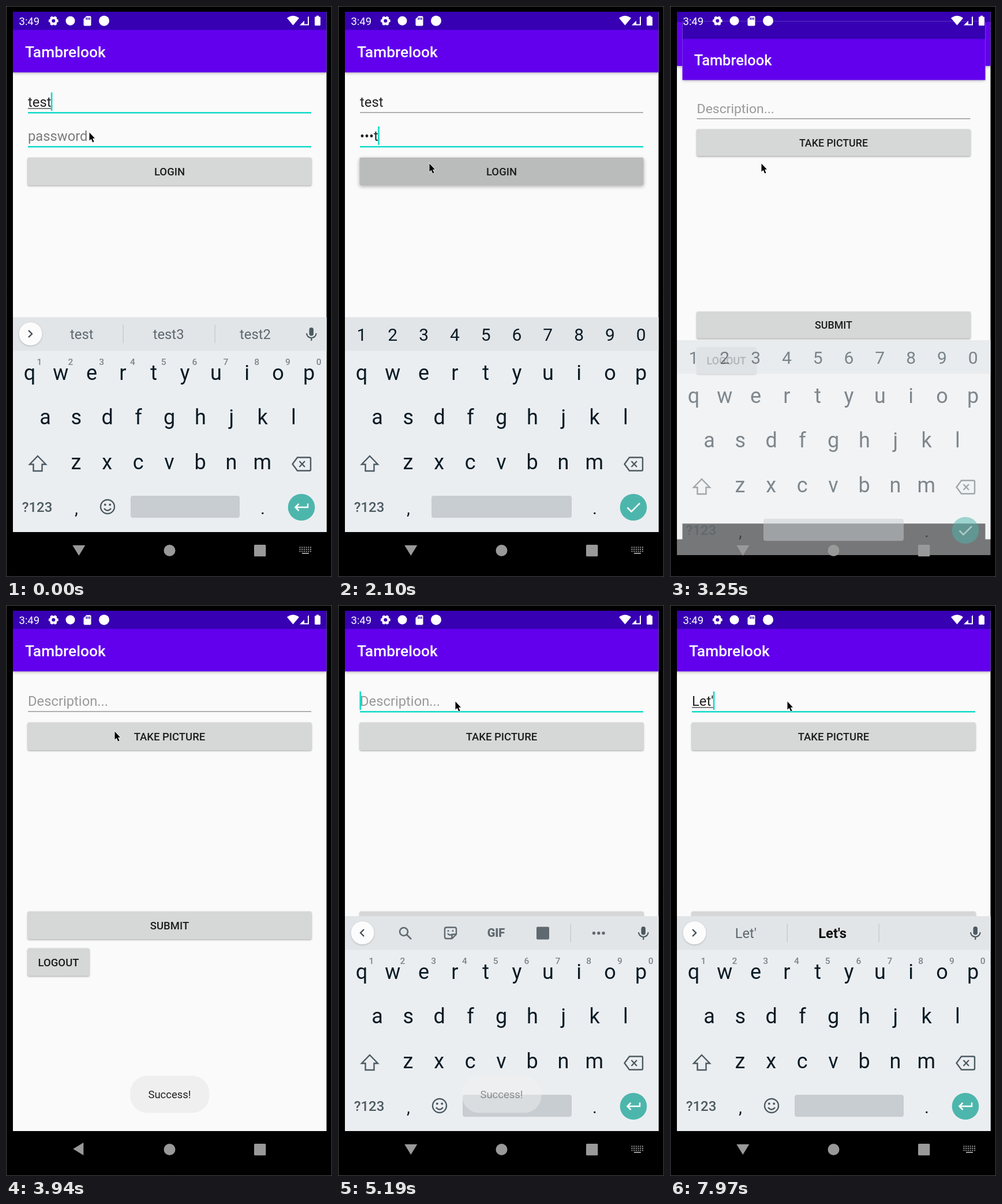
Write an HTML page with a canvas that moves like this. It is 565 px wide and 991 px high and loops after 8 s.

```html
<!DOCTYPE html>
<html lang="en">
<head>
<meta charset="utf-8">
<title>Login and compose</title>
<style>
  html, body { margin: 0; width: 100%; height: 100%; overflow: hidden; background: #000; }
  canvas { display: block; }
</style>
</head>
<body>
<canvas id="stage" width="565" height="991"></canvas>
<script>
const ctx = document.getElementById('stage').getContext('2d');
const LOOP = 8000;
const APP_NAME = 'Tambrelook';
const ACCENT = '#0fdcc8', KEY = '#0a1b25', KEY_ICON = '#4c5a62', NAV = '#999';
const CENTER_X = 283.5, CENTER_Y = 490;

// Steps: [start time, value]; each value holds until the next start.
const pointer = [[0, [144, 219]], [1300, [144, 228]], [1440, [148, 240]], [1560, [158, 270]],
  [1710, [158, 272]], [1830, [158, 273]], [3940, [188, 219]], [4060, [212, 154]],
  [4210, [208, 160]], [4340, [203, 166]], [4490, [203, 167]]];
const caretOn = [[0, 1], [1300, 0], [1830, 1], [2390, 0], [2840, 1], [5340, 0], [5900, 1], [6440, 0], [6860, 1]];
const password = [[0, ''], [490, '•e'], [620, '••s'], [890, '•••t'], [2390, '••••']];
const description = [[0, ''], [7420, 'L'], [7690, 'Le'], [7840, 'Let'], [7970, "Let'"]];
const suggestions = [[0, ['test', 'test3', 'test2']], [7420, ['L', 'I', 'Look']],
  [7690, ['Le', 'Let', 'Less']], [7840, ['Let', "Let's", 'Letter']], [7970, ["Let'", "Let's", '']]];
const loginColor = [[0, '#d6d7d7'], [1980, '#c8c9c9'], [2100, '#babcbb'], [2390, '#d6d7d7']];
const opening = [[0, { scale: .877, alpha: .1, old: 1.01 }], [3250, { scale: .965, alpha: 1, old: 1.03 }],
  [3390, { scale: .995, alpha: 1, old: 1.045 }], [3510, { scale: 1, alpha: 1, old: 1.05 }]];
const toastAlpha = [[0, 0], [3390, .7], [3510, 1], [5190, .45], [5340, 0]];
const backTurn = [[0, 1], [3390, .5], [3510, 0], [4920, .5], [5040, 1]];

const at = (steps, t) => steps.findLast(([start]) => t >= start)[1];

function group(draw) {
  ctx.save();
  draw();
  ctx.restore();
}

function zoom(scale) {
  ctx.translate(CENTER_X, CENTER_Y);
  ctx.scale(scale, scale);
  ctx.translate(-CENTER_X, -CENTER_Y);
}

function text(str, x, y, size, color, weight = 400, align = 'center') {
  ctx.font = `${weight} ${size}px Roboto, sans-serif`;
  ctx.textAlign = align;
  ctx.fillStyle = color;
  ctx.fillText(str, x, y);
  return ctx.measureText(str).width;
}

function rect(x, y, w, h, color, radius = 0) {
  ctx.fillStyle = color;
  ctx.beginPath();
  ctx.roundRect(x, y, w, h, radius);
  ctx.fill();
}

function disc(x, y, r, color) {
  ctx.fillStyle = color;
  ctx.beginPath();
  ctx.arc(x, y, r, 0, Math.PI * 2);
  ctx.fill();
}

function fill(d, color) {
  ctx.fillStyle = color;
  ctx.fill(new Path2D(d));
}

function line(d, color, width = 2.4) {
  ctx.strokeStyle = color;
  ctx.lineWidth = width;
  ctx.stroke(new Path2D(d));
}

function shadow(blur, dy, alpha) {
  ctx.shadowColor = `rgba(0,0,0,${alpha})`;
  ctx.shadowBlur = blur;
  ctx.shadowOffsetY = dy;
}

function button(label, y, color = '#d6d7d7', w = 492, pressed = false) {
  group(() => {
    shadow(pressed ? 6 : 3, pressed ? 2 : 1.3, .32);
    rect(37.5, y, w, 48.2, color, 2.6);
  });
  text(label, 37.5 + w / 2, y + 31, 18.49, '#1c1c1c', 500);
}

function field(top, { value, hint = '', hintColor, focused, accent = focused, composing, caret }) {
  const x = 38, base = top + 25;
  if (!value) text(hint, x, base, 23.77, hintColor, 400, 'left');
  const w = value ? text(value, x, base, 23.77, '#222', 400, 'left') : 0;
  if (composing && value) rect(x, base + 2.2, w, 1.4, '#333');
  if (accent) rect(x, top + 34, 491, 2.6, ACCENT);
  else rect(x, top + 34.2, 491, 1.4, '#868686');
  if (focused && caret) rect(x + w - .6, top, 2.6, 32, ACCENT);
}

function appWindow() {
  rect(12, 10, 544, 903, '#fafafa');
  rect(12, 913, 544, 68, '#000');
  group(() => {
    shadow(5, 2, .3);
    rect(12, 41, 544, 74.3, '#6200ee');
  });
  rect(12, 10, 544, 31.5, '#3700b3');
  text(APP_NAME, 33, 88.5, 26.4, '#fff', 500, 'left');
}

function loginWindow(t) {
  const moved = t >= 310, caret = at(caretOn, t);
  appWindow();
  field(150, { value: 'test', focused: !moved, composing: !moved, caret });
  field(209, { value: at(password, t), hint: 'password', hintColor: '#7b7b7b', focused: moved, accent: true, caret });
  button('LOGIN', 263, at(loginColor, t), 492, t >= 1980 && t < 2390);
}

function composeWindow(t) {
  appWindow();
  field(150, { value: at(description, t), hint: 'Description...', hintColor: '#999',
    focused: t >= 4780, composing: true, caret: at(caretOn, t) });
  button('TAKE PICTURE', 203.8);
  button('SUBMIT', 531.8);
  button('LOGOUT', 595.6, '#d6d7d7', 107);
}

function roundToggle(direction) {
  group(() => {
    shadow(3, 1, .22);
    disc(42.5, 569, 20, '#fcfcfc');
  });
  line(`M${42 - 3 * direction} 563l${6 * direction} 6l${-6 * direction} 6`, '#444f55');
}

function microphone() {
  rect(525.5, 558, 7.5, 14.5, KEY_ICON, 3.75);
  line('M521 568a8.3 8 0 0 0 16.6 0M529.3 576v5', KEY_ICON, 2.2);
}

function divider(x) {
  rect(x, 553, 1.3, 32, '#c3c8cb');
}

function suggestionStrip(words, corrected) {
  roundToggle(1);
  words.forEach((word, i) => {
    const bold = corrected && i === 1;
    text(word, 131.3 + 150.3 * i, 578.3, 23.77, bold ? '#101010' : '#5c686f', bold ? 700 : 400);
  });
  divider(202.5);
  divider(361.5);
  microphone();
}

function toolStrip() {
  const color = '#5f6a70';
  roundToggle(-1);
  line('M121 567a7 7 0 1 0-14 0a7 7 0 1 0 14 0M119 572l8 8', color, 2.6);
  line('M188 559.5h14q3 0 3 3v9l-7.5 7.5h-9.5q-3 0-3-3v-13.500q0-3 3-3zM205 571.5h-4.500q-3 0-3 3v4.500M190 570q4 5 8 1', color);
  disc(191, 565.5, 1.5, color);
  disc(199, 565.5, 1.5, color);
  text('GIF', 274, 576, 20, color, 900);
  rect(344, 558.5, 22, 22, color, 2);
  divider(402.5);
  for (const x of [443.5, 451.8, 460]) disc(x, 569.5, 2.7, color);
  microphone();
}

function keyRow(letters, startX, base, size = 36) {
  [...letters].forEach((letter, i) => text(letter, startX + 53.8 * i, base, size, KEY));
}

function keyboard(t) {
  const numeric = t >= 310 && t < 4000;
  rect(12, 540, 544, 373, '#ebeef1');
  rect(12, 540, 544, 58.5, '#e2e5e8');
  if (numeric) keyRow('1234567890', 41, 581, 30);
  else if (t >= 5190 && t < 7420) toolStrip();
  else suggestionStrip(at(suggestions, t), t >= 7840);

  keyRow('qwertyuiop', 41, 648.5);
  keyRow('asdfghjkl', 68, 726);
  keyRow('zxcvbnm', 121.500, 804);
  if (!numeric) {
    [...'1234567890'].forEach((digit, i) => text(digit, 58 + 53.8 * i, 622.5, 15.5, '#7b858a', 500));
    line('M188 869a12 12 0 1 0-24 0a12 12 0 1 0 24 0M170 872q6 7 12 0', KEY_ICON);
    disc(171.8, 865.5, 1.9, KEY_ICON);
    disc(180.2, 865.5, 1.9, KEY_ICON);
  }
  line('M55 781l14 14.500h-6.500v11.500h-15v-11.500h-6.500z', KEY_ICON);
  line('M505 783.5h21q2 0 2 2v19q0 2-2 2h-21l-8.500-11.500zM508.500 790l9.500 10m0-10l-9.500 10', KEY_ICON);
  text('?123', 54, 877.5, 24, KEY_ICON, 500);
  text(',', 122, 882, 30, KEY);
  text('.', 445, 882, 30, KEY);
  const spaceX = numeric ? 162 : 216;
  rect(spaceX, 850, 405 - spaceX, 38.3, '#c8cdd1', 4);
  disc(512, 870, 23.3, '#4db6ac');
  line(numeric ? 'M501.500 870.500l7 7l14.500-14.500' : 'M523 863.500v6.500h-21M507.500 864l-6 6l6 6', '#fff', 2.5);
}

function toast(alpha) {
  if (!alpha) return;
  group(() => {
    ctx.globalAlpha = alpha;
    rect(215, 817, 137.5, 64.5, '#efefef', 30);
    text('Success!', CENTER_X, 856, 18.49, '#222');
  });
}

function statusIcons() {
  text('3:49', 22.5, 32.8, 18.49, '#fff', 400, 'left');
  group(() => {
    ctx.translate(82.3, 25.7);
    line('M5 0a5 5 0 1 0-10 0a5 5 0 1 0 10 0', '#fff', 4);
    for (let i = 0; i < 6; i++) {
      ctx.rotate(Math.PI / 3);
      line('M5 0H8.300', '#fff', 4.5);
    }
  });
  disc(111.5, 25.7, 8, '#fff');
  fill('M139.500 17.500h6q2 0 2 2v13q0 2-2 2h-9q-2 0-2-2v-10z', '#fff');
  for (const x of [138.5, 141.3, 144.1]) rect(x, 20, 1.5, 4, '#3700b3');
  disc(170, 25.7, 9, '#fff');
  fill('M487 21q10.500-8 21 0l-10.500 12.500z', '#fff');
  fill('M509 33.500l16-16v16z', '#fff');
  fill('M517 31.500v-7.200l6-4.500v11.700z', '#3700b3');
  rect(535, 18.5, 10, 15.5, '#fff', 1.5);
  rect(538, 16.8, 4, 3, '#fff');
}

function navIcons(t) {
  group(() => {
    ctx.translate(126.3, 944);
    ctx.rotate(-Math.PI / 2 * at(backTurn, t));
    fill('M-10 0L8-11V11z', NAV);
  });
  disc(CENTER_X, 945, 10, NAV);
  rect(430, 935, 20.3, 20.3, NAV, 1.5);
  if (t >= 3120 && t < 5040) return;
  for (let row = 0; row < 3; row++)
    for (let col = 0; col < 6; col++) rect(508.5 + 3.7 * col, 938.5 + 3.5 * row, 2, 2, NAV);
  rect(513, 949, 12, 2, NAV);
}

function mousePointer([x, y]) {
  group(() => {
    ctx.translate(x, y);
    const arrow = 'M.5 .5V14.500L3.700 11.700L6.200 17.500L8.500 16.500L6 10.800H10z';
    line(arrow, 'rgba(255,255,255,.8)', 1.5);
    fill(arrow, '#000');
  });
}

function screen(t) {
  const step = at(opening, t);
  if (t < 3510) group(() => {
    if (t >= 3120) zoom(step.old);
    loginWindow(t);
  });
  if (t >= 3120) group(() => {
    ctx.globalAlpha = step.alpha;
    zoom(step.scale);
    composeWindow(t);
  });
  if (t < 3390 || t >= 5190) group(() => {
    if (t >= 3120 && t < 3250) zoom(step.old);
    if (t >= 3250 && t < 3390) {
      ctx.globalAlpha = .5;
      ctx.translate(0, 40);
    }
    keyboard(t);
  });
}

function frame() {
  const t = performance.now() % LOOP;
  rect(0, 0, 565, 991, '#000');
  line('M.5 0V990.500H564.500V.5H0', '#4a4a4a', 1);
  group(() => {
    ctx.beginPath();
    ctx.rect(12, 10, 543.5, 970);
    ctx.clip();
    screen(t);
    toast(at(toastAlpha, t));
  });
  statusIcons();
  navIcons(t);
  mousePointer(at(pointer, t));
  requestAnimationFrame(frame);
}
requestAnimationFrame(frame);
</script>
</body>
</html>
```
